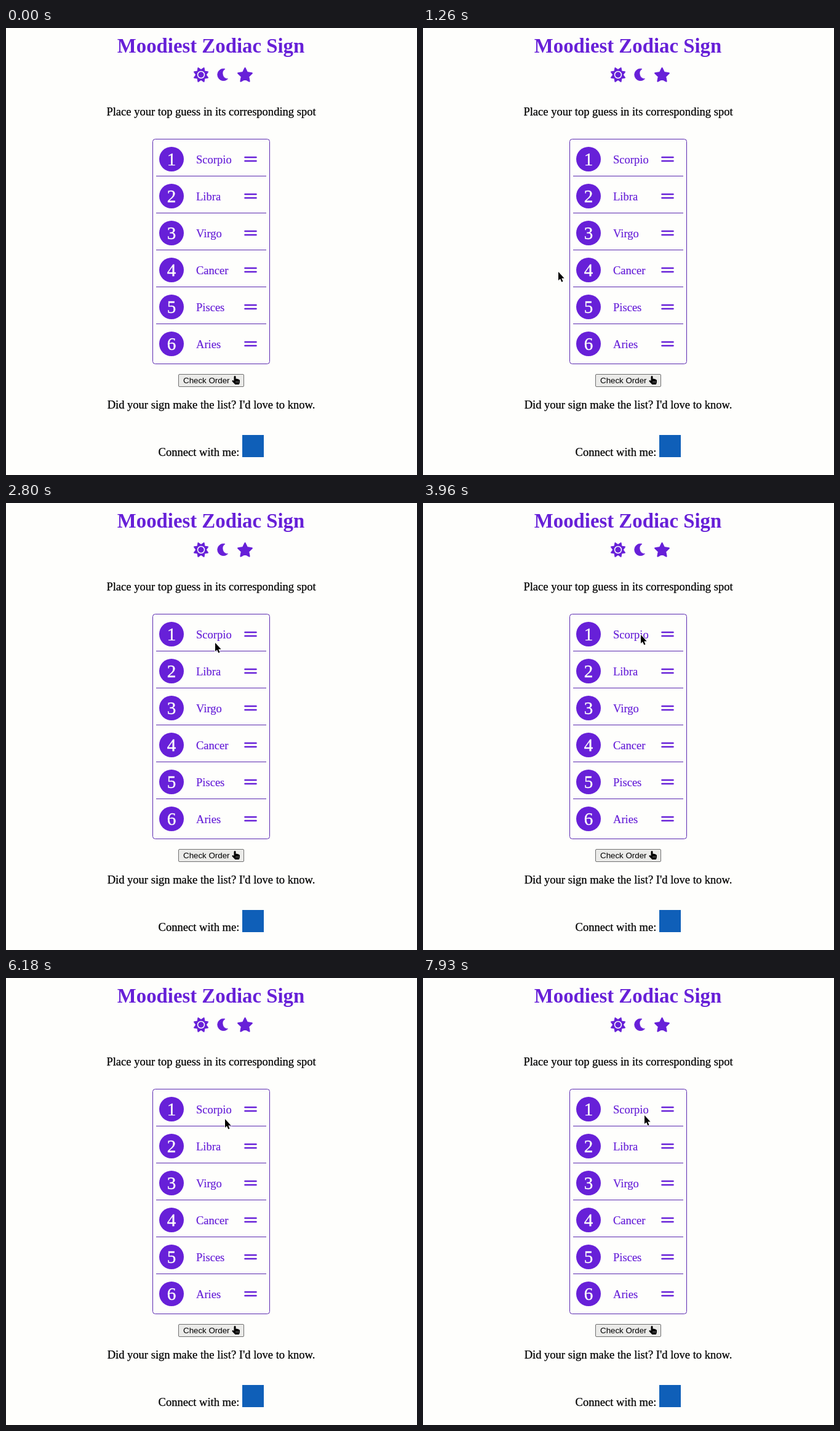
An HTML page that plays this animation: 668 px wide and 726 px high, repeating every 8 s.

```html
<!DOCTYPE html>
<html lang="en">
<head>
<meta charset="utf-8">
<title>Moodiest Zodiac Sign</title>
<style>
  :root { --paper: #fefefc; --purple: #6720d8; --line: #5a28b0; }
  html, body { margin: 0; width: 100%; height: 100%; overflow: hidden; background: var(--paper); }
  svg { display: block; width: 668px; height: 726px; }
  text { font: 18.55px "Liberation Serif", serif; }
  .copy { text-anchor: middle; stroke: #000; stroke-width: .25px; }
  .title { font-size: 32.8px; font-weight: bold; text-anchor: middle; fill: var(--purple); }
  .rank { font-size: 29px; text-anchor: middle; fill: var(--paper); stroke: var(--paper); stroke-width: .4px; }
  .sign { fill: var(--purple); stroke: var(--purple); stroke-width: .2px; }
  .button { font: 13.333px "Liberation Sans", sans-serif; }
  .icon { fill: var(--purple); stroke: var(--purple); stroke-linejoin: round; }
  .ring { fill: none; stroke: var(--paper); stroke-width: 1.5; }
  .disc { fill: var(--purple); }
  .rule { fill: none; stroke: var(--line); }
  .grip { stroke: var(--purple); stroke-width: 2.6; stroke-linecap: round; }
</style>
</head>
<body>
<svg viewBox="0 0 668 726">
  <text class="title" x="333" y="40">Moodiest Zodiac Sign</text>

  <g class="icon">
    <polygon id="sun" stroke-width="1"/>
    <circle class="ring" cx="317" cy="76" r="5.5"/>
    <path d="M356 66.500A9.700 9.700 0 1 0 360.500 82.500A8.700 8.700 0 0 1 356 66.500Z" stroke-width=".8"/>
    <polygon id="star" stroke-width="2.400"/>
  </g>

  <text class="copy" x="333.500" y="142">Place your top guess in its corresponding spot</text>

  <rect class="rule" x="238.500" y="180.500" width="190" height="365" rx="4"/>
  <g id="list"></g>

  <rect x="280.500" y="562.500" width="106" height="20" rx="1.500" fill="#ebebe9" stroke="#707070"/>
  <text class="button" x="288" y="577">Check Order</text>
  <path d="M370.500 566.500Q370.500 565 372 565T373.500 566.500V570Q375 569 376 570.300Q377.500 569.600 378.300 571Q380 570.800 380 572.500V575Q380 577 378.500 579H372.500L367.600 574Q367 572.500 368.500 572L370.500 573Z"/>
  <path d="M374 573.500V576M376 573.500V576M378 573.500V576" stroke="#ebebe9" stroke-width=".5"/>

  <text class="copy" x="333.500" y="617.500">Did your sign make the list? I'd love to know.</text>
  <text class="copy" x="313.500" y="694.500">Connect with me:</text>
  <rect x="384" y="661" width="35" height="36" fill="#0f5fb8"/>

  <path id="cursor" d="M0 0V14L3 11.200L5.300 16.500L7.500 15.600L5.300 10.400H9.600Z"
        stroke="#fff" stroke-width="1.800" paint-order="stroke" visibility="hidden"/>
</svg>
<script>
  const LOOP = 8000;
  const byId = id => document.getElementById(id);

  function spikes(id, cx, cy, count, outer, inner, turn = 0) {
    const points = Array.from({ length: count * 2 }, (_, i) => {
      const angle = (i + turn) * Math.PI / count - Math.PI / 2;
      const radius = i % 2 ? inner : outer;
      return [cx + radius * Math.cos(angle), cy + radius * Math.sin(angle)];
    });
    byId(id).setAttribute("points", points.join(" "));
  }
  spikes("sun", 317, 76, 8, 12.8, 8.4, 1);
  spikes("star", 388.5, 77, 5, 11.8, 5.8);

  const signs = ["Scorpio", "Libra", "Virgo", "Cancer", "Pisces", "Aries"];
  byId("list").innerHTML = signs.map((sign, i) => `
    <g transform="translate(0 ${i * 60})">
      <circle class="disc" cx="269" cy="213" r="20"/>
      <text class="rank" x="269" y="222.5">${i + 1}</text>
      <text class="sign" x="309" y="219.5">${sign}</text>
      <path class="grip" d="M388.500 210H406.500M388.500 216H406.500"/>
      ${i < 5 ? '<path class="rule" d="M244 240.500H423"/>' : ""}
    </g>`).join("");

  // Pointer stops: time, x, y
  const stops = [
    [530, 120, 726], [1260, 219, 396], [1400, 219, 396], [2600, 339, 227],
    [3080, 339, 227], [3960, 353, 214], [4660, 353, 214], [5500, 355, 229],
    [6440, 355, 229], [7140, 353, 239], [7280, 353, 239], [7930, 359, 223], [LOOP, 359, 223]
  ];

  function draw(now) {
    const time = now % LOOP;
    const next = stops.findIndex(stop => stop[0] > time);
    const cursor = byId("cursor");
    cursor.setAttribute("visibility", next > 0 ? "visible" : "hidden");
    if (next > 0) {
      const [t0, x0, y0] = stops[next - 1];
      const [t1, x1, y1] = stops[next];
      const p = (time - t0) / (t1 - t0);
      const eased = p * p * (3 - 2 * p);
      const x = x0 + (x1 - x0) * eased, y = y0 + (y1 - y0) * eased;
      cursor.setAttribute("transform", `translate(${Math.round(x) + 1} ${Math.round(y)})`);
    }
    requestAnimationFrame(draw);
  }
  requestAnimationFrame(draw);
</script>
</body>
</html>
```
